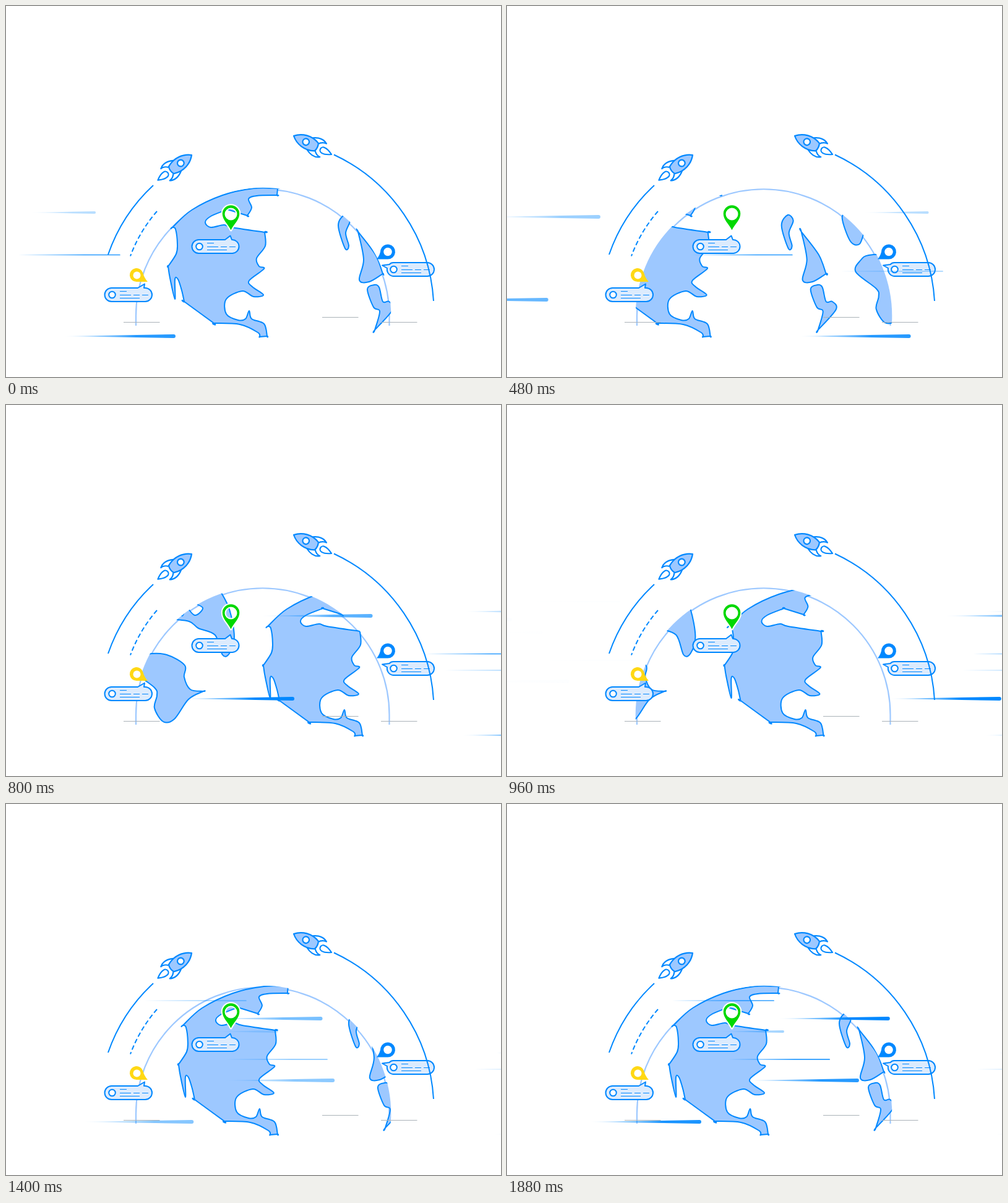
Write an HTML page that moves like this. It is 800 px wide and 600 px high and loops after 2 s.

```html
<!DOCTYPE html>
<html>
<head>
<meta charset="utf-8">
<style>
html, body { margin: 0; width: 100%; height: 100%; overflow: hidden; background: #fff; }
svg { display: block; }
</style>
</head>
<body>
<svg width="800" height="600" viewBox="0 0 800 600" fill="none" stroke-linejoin="round">
  <defs>
    <clipPath id="globe"><circle cx="415" cy="501" r="207.3"/></clipPath>
    <linearGradient id="fade">
      <stop offset="0" stop-color="#08f" stop-opacity="0"/>
      <stop offset=".65" stop-color="#08f"/>
    </linearGradient>
    <g id="rocket" stroke="#08f" stroke-width="2.2">
      <g fill="#fff">
        <path id="fin" d="M29 10.500Q43 19 53 12Q46 12 42 6.500"/>
        <use href="#fin" transform="scale(1 -1)"/>
        <path d="M68 0Q59 5.500 53 5A5 5 0 0 1 53 -5Q59 -5.500 68 0Z"/>
      </g>
      <path fill="#9dc8ff" d="M0 0C10 -10 26 -14 41 -7Q44 0 41 7C26 14 10 10 0 0Z"/>
      <circle cx="22" r="5.300" fill="#fff"/>
    </g>
    <g id="label" stroke="#08f">
      <circle cx="12.500" cy="11" r="5.300" fill="#fff" stroke-width="2"/>
      <path d="M25 5.500H36M25 11.500H43M47 11.500H57M61 11.500H71M25 16.500H57"/>
    </g>
  </defs>

  <path d="M210 517V501A204.750 204.750 0 0 1 619.500 501V517" stroke="#9dc8ff" stroke-width="2.200"/>
  <g clip-path="url(#globe)">
    <g id="map" fill="#9dc8ff" stroke="#08f" stroke-width="2">
      <g id="land"></g>
      <use href="#land" x="604"/>
    </g>
  </g>
  <path d="M511 503.500H569.500M190 511.500H248.500M606 511.500H664.500" stroke="#aab2b8"/>

  <g fill="#dcebfd" stroke="#08f" stroke-width="2">
    <path d="M311.500 378H354L362.500 371.500L365 378A11 11 0 0 1 366 400H311.500A11 11 0 0 1 311.500 378Z"/>
    <path d="M170.500 456H213L224 449.500L223 456H225A11 11 0 0 1 225 478H170.500A11 11 0 0 1 170.500 456Z"/>
    <path d="M626 415H681A11 11 0 0 1 681 437H626A11 11 0 0 1 616 424L608 419.500L619.500 418Q622 415 626 415Z"/>
  </g>
  <use href="#label" x="300" y="378"/>
  <use href="#label" x="159" y="456"/>
  <use href="#label" x="614" y="415"/>

  <g stroke="#08f" stroke-width="2">
    <path d="M165 402A275 275 0 0 1 238 290"/>
    <path d="M530 240.500A280 280 0 0 1 691 477"/>
    <path d="M244 332A232 232 0 0 0 201 404.500" stroke-dasharray="7.500 4.100"/>
  </g>
  <use href="#rocket" transform="translate(300 241) rotate(143.300)"/>
  <use href="#rocket" transform="translate(465 210) rotate(26.200)"/>

  <path fill="#00d800" stroke="#fff" stroke-width="4" paint-order="stroke" fill-rule="evenodd"
    d="M363.500 362.500C359 353 349.700 346 349.700 336A13.800 13.800 0 0 1 377.300 336C377.300 346 368 353 363.500 362.500ZM353.500 336.500A10 10 0 0 0 373.500 336.500A10 10 0 0 0 353.500 336.500Z"/>
  <path fill="#ffd814" d="M229 446H211A11 11 0 1 1 221.500 432Q223 439 229 446Z"/>
  <circle cx="211.500" cy="435.500" r="6" fill="#fff"/>
  <path fill="#08f" d="M599 409.500Q605 402 605.500 394A12 12 0 1 1 617 409.500Z"/>
  <circle cx="617" cy="397.500" r="6.800" fill="#fff"/>
  <g id="streaks"></g>
</svg>
<script>
const $ = id => document.getElementById(id);
const clamp = v => Math.min(1, Math.max(0, v));

function addPath(parent, d) {
  const p = document.createElementNS('http://www.w3.org/2000/svg', 'path');
  p.setAttribute('d', d);
  return parent.appendChild(p);
}

// Closed smooth curve through key points; a star marks a sharp corner.
function addLand(text) {
  const pts = text.split(' ').flatMap(s => {
    const p = s.replace('*', '').split(',').map(Number);
    return s.endsWith('*') ? [p, p] : [p];
  });
  const n = pts.length, at = i => pts[(i + n) % n];
  let d = 'M' + at(0);
  for (let i = 0; i < n; i++) {
    const [a, b, c, e] = [at(i - 1), at(i), at(i + 1), at(i + 2)];
    d += 'C' + [0, 1].map(k => b[k] + (c[k] - a[k]) / 6) + ' ' +
      [0, 1].map(k => c[k] - (e[k] - b[k]) / 6) + ' ' + c;
  }
  addPath($('land'), d + 'Z');
}

// North America
addLand('269,358* 300,330 350,306 400,295 439,295* 438,306* 405,307 392,312 397,326 390,339* ' +
  '358,329* 331,340 322,350 331,358 352,354 365,358 418,366* 419,388 405,408 409,421 417,425 ' +
  '393,444 398,454 416,467 400,470 382,461 356,474 356,498 375,508 387,506 393,493 397,506 ' +
  '417,514 422,534* 410,535* 407,528 378,515 336,513* 288,478* 284,460 278,442 273,442 273,474 ' +
  '265,440 262,421* 275,401 277,385 274,361');
// Greenland and the southern pair
addLand('547,338 556,347 549,367 554,388 548,392 537,355');
addLand('569,365* 597,402 609,433* 587,446 571,443 578,410');
addLand('584,458 595,451 603,455 609,478 619,478 625,491 596,524* 604,494 594,487');
// Islands, Africa, Eurasia
addLand('635,343 645,334 666,333 681,352 672,362 663,385 648,380');
addLand('678,403 710,404 739,421 738,440 748,460 769,463* 745,476 722,508 704,512 690,490 ' +
  '694,470 690,457 657,430 665,411');
addLand('703,330 708,320 721,321 735,341 740,323* 755,340 768,328 750,318 745,308 766,296* ' +
  '796,300* 811,330 819,375 811,402 800,404 788,372 761,361 746,350 709,344');

const thick = { w: 6, len: 182 }, slim = { w: 4, len: 108 }, thin = { w: 1.7, len: 165 };
const streaks = [];

// Streaks in a group share their pace and the time over which they fade in.
function group(pace, born, ramp, add) {
  add((y, { w, len }, alpha, from, to, mid) => {
    const r = w / 2, back = w < 3 ? r : 0;
    const el = addPath($('streaks'),
      `M${-len} ${-back}L${-r} ${-r}A${r} ${r} 0 0 1 ${-r} ${r}L${-len} ${back}Z`);
    el.setAttribute('fill', 'url(#fade)');
    streaks.push(t => {
      const x = from + (to - from) / (1 + Math.exp((mid - t) / pace));
      el.setAttribute('transform', `translate(${x} ${y})`);
      el.setAttribute('opacity', alpha * clamp((t - born) / ramp));
    });
  });
}

group(200, -1, 1, streak => {
  streak(334, slim, .28, -100, 900, 225);
  streak(429, thin, .4, -500, 925, 140);
});
group(140, -1, 1, streak => {
  streak(402.5, thin, .85, 170, 960, 555);
  streak(534, thick, .85, 245, 970, 445);
});
group(120, 0, 800, streak => {
  streak(341, thick, .65, 85, 1100, 800);
  streak(475, thick, 1, 15, 1080, 837);
});
group(75, 950, 850, streak => {
  streak(447, thick, .85, 85, 569, 1215);
  streak(318, thin, .8, 180, 432, 1282);
  streak(347, thick, 1, 0, 619, 1283);
  streak(368, slim, .35, 0, 448, 1103);
  streak(413, thin, 1, 0, 522, 990);
  streak(514, thick, .9, -100, 314, 1128);
});

// Cubic Bézier easing (.57, 0, 0, 1)
function ease(x) {
  let lo = 0, hi = 1;
  for (let k = 0; k < 24; k++) {
    const s = (lo + hi) / 2;
    if (1.71 * s * (1 - s) ** 2 + s ** 3 < x) lo = s; else hi = s;
  }
  return lo * lo * (3 - 2 * lo);
}

const start = performance.now();
function tick() {
  const now = (performance.now() - start) % 2000;
  const t = Math.min(1880, Math.floor(now / 40) * 40);
  $('map').setAttribute('transform', `translate(${-604 * ease(t / 1880)})`);
  streaks.forEach(move => move(t));
  requestAnimationFrame(tick);
}
tick();
</script>
</body>
</html>
```
